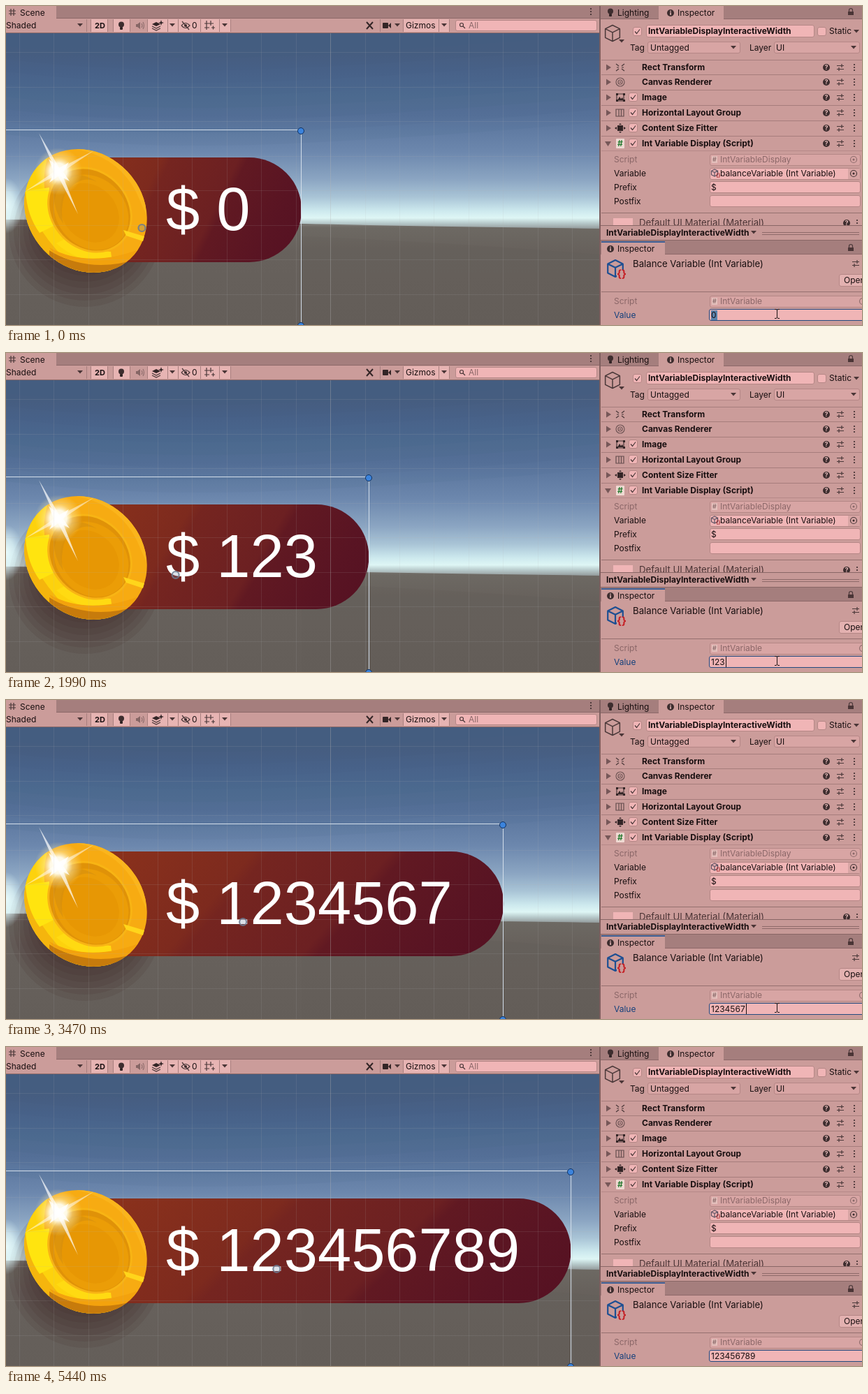
An HTML page for the animation above (5.56 s loop, 1225 by 457 pixels).

```html
<!DOCTYPE html>
<html lang="en">
<head>
<meta charset="utf-8">
<title>Int variable display</title>
<style>
html, body { margin: 0; width: 100%; height: 100%; overflow: hidden; background: #cb9c9a; }
svg { display: block; width: 1225px; height: 457px; }
text { font: 12px Inter, sans-serif; fill: #190f10; white-space: pre; }
.bold { font-weight: 700; }
.big { font-size: 13.2px; }
.dim { fill: #8b6768; }
#amount { font: 86.7px "Liberation Sans", Arial, sans-serif; fill: #fff; }
.icon { fill: none; stroke: #4a3839; stroke-width: 1.2; }
</style>
</head>
<body>
<svg id="stage" viewBox="0 0 1225 457" xmlns="http://www.w3.org/2000/svg">
  <defs>
    <linearGradient id="sky" x2="0" y2="1">
      <stop stop-color="#4c607f"/><stop offset=".2" stop-color="#4f678e"/>
      <stop offset=".42" stop-color="#58739b"/><stop offset=".6" stop-color="#6c87ad"/>
      <stop offset=".74" stop-color="#8ba5c2"/><stop offset=".83" stop-color="#a9c4d6"/>
      <stop offset=".9" stop-color="#cde9ee"/><stop offset=".935" stop-color="#def6f5"/>
      <stop offset=".96" stop-color="#b9cccd"/><stop offset="1" stop-color="#85898a"/>
    </linearGradient>
    <linearGradient id="ground" x2="0" y2="1">
      <stop stop-color="#7f7e79"/><stop offset=".08" stop-color="#6d6963"/>
      <stop offset=".3" stop-color="#67615c"/><stop offset="1" stop-color="#645e59"/>
    </linearGradient>
    <linearGradient id="maroon" x2="1.154" y2=".231">
      <stop offset=".12" stop-color="#8a311c"/><stop offset=".38" stop-color="#7d2a1e"/>
      <stop offset=".41" stop-color="#752520"/><stop offset=".63" stop-color="#6c2022"/>
      <stop offset=".66" stop-color="#611922"/><stop offset=".85" stop-color="#591423"/>
      <stop offset="1" stop-color="#551122"/>
    </linearGradient>
    <radialGradient id="glow">
      <stop stop-color="#fff"/><stop offset=".35" stop-color="#fffdf0" stop-opacity=".95"/>
      <stop offset=".6" stop-color="#fff1b8" stop-opacity=".45"/><stop offset="1" stop-color="#ffe9a0" stop-opacity="0"/>
    </radialGradient>
    <radialGradient id="haze">
      <stop stop-color="#e9fbfb"/><stop offset=".5" stop-color="#dcf2f5" stop-opacity=".7"/>
      <stop offset="1" stop-color="#c9e0ea" stop-opacity="0"/>
    </radialGradient>
    <clipPath id="view"><rect y="38" width="850" height="419"/></clipPath>
    <clipPath id="coinEdge"><ellipse rx="93.7" ry="82.2" transform="translate(114 293.5) rotate(47)"/></clipPath>
    <clipPath id="materialRow"><rect x="852" y="297" width="373" height="17"/></clipPath>
  </defs>

  <g clip-path="url(#view)">
    <rect y="38" width="850" height="284" fill="url(#sky)"/>
    <g id="skyBands" fill="#3c5378" fill-opacity=".06"/>
    <path d="M0 306Q300 309 425 312T850 319V457H0Z" fill="url(#ground)"/>
    <path d="M423 330Q620 338 850 356V457H423Z" fill="#5f5954" opacity=".2"/>
    <g id="coinShadow" fill="#3b1c20" fill-opacity=".11"/>
    <ellipse cx="0" cy="286" rx="24" ry="40" fill="url(#haze)"/>
    <rect id="pill" x="57" y="217" height="150" rx="75" fill="url(#maroon)"/>
    <g clip-path="url(#coinEdge)">
      <rect x="20" y="195" width="190" height="195" fill="#f7ab12"/>
      <path d="M20 250L60 215Q38 290 105 358L150 372V395H20Z" fill="#fdd20d"/>
      <path d="M28 262Q34 310 82 360L70 382L20 330Z" fill="#f5b50d"/>
      <path d="M28 265L62 260Q60 290 74 312L48 325Q30 300 28 265Z" fill="#ffe40f"/>
      <path d="M72 340L95 328Q118 350 150 352L152 366Q105 370 72 340Z" fill="#ffda12"/>
      <path d="M62 350Q110 382 192 358V395H62Z" fill="#c77b0c"/>
      <path d="M62 346Q120 378 200 345L190 362Q120 384 66 352Z" fill="#f3a20d"/>
      <path d="M95 204Q160 214 187 268L201 300L196 240L130 195Z" fill="#fbb51c"/>
    </g>
    <g transform="translate(120 292) rotate(47)">
      <ellipse rx="66" ry="56" fill="#f8b414"/>
      <ellipse rx="63" ry="53" fill="#e09208"/>
      <ellipse cx="4" cy="1" rx="58" ry="49" fill="#eb9d07"/>
      <ellipse cx="3" cy="3" rx="46" ry="38" fill="#e79704"/>
    </g>
    <path d="M69 262Q94 228 130 252Q106 240 84 270Q77 294 82 312Q66 290 69 262Z" fill="#cf8b13" opacity=".5"/>
    <path d="M168 321L198 330L196 337L172 329Z" fill="#ffd51b"/>
    <circle cx="75" cy="237" r="34" fill="url(#glow)"/>
    <g fill="#fff">
      <path d="M47 182L78 235L103 298L72 239Z" opacity=".7"/>
      <path d="M126 207L77 240L27 266L74 234Z" opacity=".5"/>
      <path d="M61 219L76 232L90 224L82 238L91 251L76 243L62 253L69 239Z" opacity=".8"/>
    </g>
    <g id="grid" stroke="#b6b6b6"/>
    <path id="frame" fill="none" stroke="#d3deea" stroke-width="1"/>
    <text id="amount" y="321" text-anchor="middle"></text>
    <circle id="pivot" cy="318" r="5" fill="#7088a8" fill-opacity=".25" stroke="#6b7a91" stroke-opacity=".85" stroke-width="2.2"/>
    <g id="handles" fill="#3b83dc" stroke="#10305f"><circle cy="179" r="4.5"/><circle cy="458" r="4.5"/></g>
  </g>

  <g id="toolbar"></g>
  <g id="inspector"></g>
  <rect id="selection" x="1009" y="436" width="9" height="14" fill="#5c83ad"/>
  <text id="value" x="1009" y="447"></text>
  <rect id="caret" y="435" width="1" height="15" fill="#190f10"/>
  <path id="beam" d="M-3 -6.500H-1L.5 -5.500L2 -6.500H4M.5 -5.500V5.500M-3 6.500H-1L.5 5.500L2 6.500H4" fill="none" stroke="#1c1415"/>
  <path id="arrow" d="M0 0V15L4 11.500L7 17L9 16L6.500 11H11Z" fill="#fff" stroke="#000"/>
</svg>
<script>
const $ = id => document.getElementById(id);
const range = (n, make) => Array.from({ length: n }, (_, i) => make(i)).join('');

const rect = (x, y, w, h, fill, extra = '') =>
  `<rect x="${x}" y="${y}" width="${w}" height="${h}" fill="${fill}" ${extra}/>`;
const label = (x, y, text, cls = '', extra = '') =>
  `<text x="${x}" y="${y}" class="${cls}" ${extra}>${text}</text>`;
const path = (d, extra = 'class="icon"') => `<path d="${d}" ${extra}/>`;
const solid = (d, fill = '#332526') => path(d, `fill="${fill}"`);
const dot = (x, y, r, fill = '#3d2d2e') => `<circle cx="${x}" cy="${y}" r="${r}" fill="${fill}"/>`;
const ring = (x, y, r) => `<circle cx="${x}" cy="${y}" r="${r}" class="icon"/>`;
const line = (x, y, w, color = '#95706f') => rect(x, y, w, 1, color);
const down = (x, y) => solid(`M${x - 4} ${y - 2}h8l-4 4.500z`, '#4a3536');
const kebab = (x, y) => [-4, 0, 4].map(d => dot(x, y + d, 1.1)).join('');
const field = (x, y, w, h = 17, fill = '#f0b5b6') =>
  rect(x + .5, y + .5, w - 1, h - 1, fill, 'rx="2.5" stroke="#b58786"');
const bulb = (x, y) => dot(x, y - 1.5, 4) + rect(x - 2, y + 2, 4, 4, '#332526', 'rx="1"');
const info = (x, y) => dot(x, y, 5) + rect(x - .7, y - 1, 1.500, 4, '#e8bdbb') + dot(x, y - 2.600, .9, '#e8bdbb');
const lock = (x, y) => path(`M${x - 2.500} ${y - 1}v-2a2.500 2.500 0 0 1 5 0v2`) + rect(x - 4, y - 1, 8, 5, '#4a3536');
const sliders = (x, y) => path(`M${x - 5} ${y - 2.500}h10M${x - 5} ${y + 2.500}h10M${x + 2} ${y - 5}v5M${x - 2} ${y}v5`);
const help = (x, y) => dot(x, y, 5) + label(x, y + 3.300, '?', 'bold',
  'text-anchor="middle" style="font-size:9px;fill:#e8bdbb"');
const check = (x, y, on = true) => field(x - 6.5, y - 6.5, 13, 13) +
  (on ? path(`M${x - 3.500} ${y}l2.500 3l4.500 -6`) : '');
const cube = (x, y, r, color = '#4a3839', width = 1.500) => path(
  `M${x} ${y - r}l${r * .9} ${r * .45}v${r * 1.1}l${-r * .9} ${r * .45}l${-r * .9} ${-r * .45}v${-r * 1.1}zm${-r * .9} ${r * .45}l${r * .9} ${r * .45}l${r * .9} ${-r * .45}M${x} ${y - r * .1}v${r * 1.1}`,
  `fill="none" stroke="${color}" stroke-width="${width}" stroke-linejoin="round"`);
const target = (x, y) => ring(x, y, 4.5) + dot(x, y, 1.5);

function drawScene() {
  $('skyBands').innerHTML = range(8, i => {
    const y = 48 + i * 18;
    return path(`M0 ${y + 10}Q200 ${y + 34} 430 ${y + 22}T850 ${y - 8}V38H0Z`, '');
  });
  $('coinShadow').innerHTML = range(7, i =>
    `<ellipse cx="113" cy="${323 - i}" rx="${109 - i * 7}" ry="${108 - i * 8}"/>`);
  $('grid').innerHTML =
    range(17, i => path(`M${Math.round(19 + i * 49.45)}.5 38V457`, `opacity="${i === 9 ? .35 : .13}"`)) +
    range(8, i => path(`M0 ${Math.round(66 + i * 49.5)}.5H850`, 'opacity=".13"'));
}

function drawToolbar() {
  const light = '#e7b4b3';
  $('toolbar').innerHTML =
    rect(0, 0, 850, 18, '#a57e7d') + rect(0, 0, 72, 18, '#cb9c9a') +
    rect(0, 18, 850, 20, '#cb9c9a') + line(72, 17, 778, '#8d6969') + line(0, 38, 850, '#8d6969') +
    path('M7 4v10M11 4v10M4 7h10M4 11h10') + label(20, 14, 'Scene') + kebab(837, 8) +
    label(0, 32, 'Shaded') + down(106, 27) +
    [[122, 23], [154, 23], [202, 119], [569, 65]].map(([x, w]) => rect(x, 19, w, 18, light)).join('') +
    [115, 121, 145, 153, 177, 202, 231, 246, 278, 305, 321, 535, 568, 619, 634]
      .map(x => rect(x, 19, 1, 18, '#a87f7e')).join('') +
    label(127, 32, '2D', 'bold', 'style="font-size:11px"') + bulb(165, 28) +
    `<g opacity=".45">${solid('M186 26h2l4-3v10l-4-3h-2z') + path('M194 25q2 3 0 6M196 23q3 5 0 10')}</g>` +
    solid('M209 26l6-3l6 3l-6 3z') + path('M209 29l6 3l6-3M209 32l6 3l6-3') +
    solid('M222 20l1 3l3 1l-3 1l-1 3l-1-3l-3-1l3-1z') + down(238, 27) +
    path('M251 28q6-7 12 0q-6 7-12 0M252 22l10 12') + dot(257, 28, 2) + label(266, 32, '0') +
    path('M287 21v13M293 21v7M284 25h13M284 31h7M294 31h5M296.500 28.500v5') + down(313, 27) +
    path('M516 23l9 10M525 23l-9 10', 'stroke="#332526" stroke-width="2"') +
    rect(539, 24, 8, 8, '#332526', 'rx="1"') + solid('M547 28l4-4v8z') + down(560, 27) +
    label(572, 32, 'Gizmos') + down(627, 27) +
    field(643, 20, 203, 16) + ring(652, 27, 2.5) + path('M654 29l3 3') + label(662, 32, 'All', 'dim');
}

function drawComponents() {
  const names = ['Rect Transform', 'Canvas Renderer', 'Image', 'Horizontal Layout Group',
    'Content Size Fitter', 'Int Variable Display (Script)'];
  const icons = [
    y => path(`M873 ${y - 5}l4 3M885 ${y - 5}l-4 3M873 ${y + 5}l4-3M885 ${y + 5}l-4-3M874 ${y}h3M881 ${y}h3`),
    y => `<g opacity=".7">${ring(879, y, 6) + ring(879, y, 3) + dot(879, y, 1)}</g>`,
    y => path(`M874 ${y - 5}h10v10h-10z`) + solid(`M875 ${y + 4}l3-5l2 3l2-2l2 4z`) +
      [873, 883].map(x => rect(x, y - 6, 3, 3, '#332526') + rect(x, y + 3, 3, 3, '#332526')).join(''),
    y => `<g opacity=".8">${path(`M873 ${y - 5}h11v10h-11zM877 ${y - 5}v10M880.500 ${y - 5}v10`)}</g>`,
    y => rect(875, y - 4, 8, 8, '#332526') + solid(`M871 ${y}l3-2v4zM887 ${y}l-3-2v4zM879 ${y - 7}l2 2h-4zM879 ${y + 7}l2-2h-4z`),
    y => rect(873, y - 7, 12, 14, '#efd9d2', 'rx="1"') + label(879, y + 4, '#', 'bold', 'text-anchor="middle" style="fill:#287b32"')
  ];
  return names.map((name, i) => {
    const y = Math.round(87.5 + i * 21.8);
    const fold = i === 5 ? `M857 ${y - 3}h9l-4.500 7z` : `M859 ${y - 4.500}l7 4.500l-7 4.500z`;
    return line(852, y - 11, 373, '#a67d7c') + solid(fold, '#765758') + icons[i](y) +
      (i > 1 ? check(897.5, y - .5) : '') + label(910, y + 4, name, 'bold') +
      help(1174, y) + sliders(1194, y) + kebab(1214, y);
  }).join('');
}

function drawInspector() {
  const pale = '#d8a5a4';
  const tab = (x, y, w) => rect(x, y, w, 19, '#cb9c9a');
  $('inspector').innerHTML =
    rect(850, 0, 375, 457, '#cb9c9a') + rect(850, 0, 375, 19, '#a57e7d') + tab(934, 0, 93) +
    line(851, 18, 83, '#8d6969') + line(1027, 18, 198, '#8d6969') +
    bulb(865, 9) + label(875, 14, 'Lighting') + info(951, 10) + label(961, 14, 'Inspector') + lock(1209, 9) +
    cube(868, 39, 11.5) + down(881, 50) + check(903.5, 36.5) +
    field(916, 27, 241, 18) + label(919, 40, 'IntVariableDisplayInteractiveWidth', 'bold') +
    check(1167.5, 36.5, false) + label(1178, 40, 'Static') + down(1217, 36) +
    label(893, 64, 'Tag') + field(918, 51, 133, 17, pale) + label(922, 64, 'Untagged') + down(1041, 59) +
    label(1064, 64, 'Layer') + field(1099, 51, 123, 17, pale) + label(1102, 64, 'UI') + down(1213, 59) +
    drawComponents() + line(852, 207, 373, '#b58988') +
    label(870, 224, 'Script', 'dim') + field(1007, 212, 216, 17, pale) +
    `<g opacity=".5">${rect(1010, 215, 8, 10, '#efd9d2') + label(1011, 223, '#', '', 'style="font-size:9px"') + target(1213, 220)}</g>` +
    label(1022, 224, 'IntVariableDisplay', 'dim') +
    label(870, 244, 'Variable') + field(1007, 232, 216) + rect(1205, 233, 17, 15, pale) + cube(1014, 239, 5, '#5b5161', 1.2) +
    label(1016, 245, '{}', 'bold', 'style="font-size:7px;fill:#a4292c"') +
    label(1022, 244, 'balanceVariable (Int Variable)') + target(1213, 240) +
    label(870, 264, 'Prefix') + field(1007, 251, 216) + label(1009, 264, '$') +
    label(870, 284, 'Postfix') + field(1007, 271, 216) +
    line(852, 296, 373) +
    `<g clip-path="url(#materialRow)">${rect(869, 304, 28, 20, '#f0b5b6') +
      label(906, 315, 'Default UI Material (Material)', 'big', 'style="fill:#4b3435"') +
      help(1203, 311) + kebab(1218, 311)}</g>` +
    rect(850, 314, 375, 22, '#c79997') + line(850, 314, 375, '#896665') + line(850, 335, 375, '#896665') +
    label(859, 329, 'IntVariableDisplayInteractiveWidth', 'bold') + down(1070, 324) +
    line(1082, 324, 139, '#8d6969') + line(1082, 327, 139, '#8d6969') +
    rect(850, 336, 375, 20, '#a57e7d') + tab(852, 337, 91) + rect(852, 337, 91, 2, '#3c5f95') + line(943, 355, 282, '#8d6969') +
    info(865, 348) + label(875, 352, 'Inspector') + lock(1209, 347) +
    cube(872, 376, 12, '#1d4f92', 2.2) + rect(874, 379, 15, 12, '#cb9c9a') +
    label(874, 389, '{}', 'bold', 'style="font-size:15px;fill:#c51f24"') +
    label(897, 374, 'Balance Variable (Int Variable)', 'big') + sliders(1216, 369) +
    field(1192, 384, 50, 18, '#e3b1b0') + label(1199, 397, 'Open') +
    line(852, 409, 373) +
    label(870, 427, 'Script', 'dim') + field(1007, 415, 230, 17, pale) +
    `<g opacity=".5">${rect(1010, 418, 8, 10, '#efd9d2') + label(1011, 426, '#', '', 'style="font-size:9px"') + ring(1226, 423, 4.5)}</g>` +
    label(1022, 427, 'IntVariable', 'dim') +
    label(870, 447, 'Value', '', 'style="fill:#14407c"') +
    rect(1006.5, 434.5, 230, 16, '#f0b5b6', 'rx="2.5" stroke="#234a80"') +
    rect(849, 0, 2, 457, '#7f5f5f');
}

const LOOP = 5560;
const keyTimes = [1030, 1540, 1960, 2670, 2880, 3160, 3470, 3720, 4210];
const redrawTimes = keyTimes.map(t => t === 1960 || t === 2880 ? t + 30 : t);
const countBefore = (times, t) => times.filter(k => k <= t).length;
const typed = n => n ? '123456789'.slice(0, n) : '0';
const show = (id, on) => $(id).setAttribute('visibility', on ? 'visible' : 'hidden');
const set = (id, name, value) => $(id).setAttribute(name, value);

function update(t) {
  // The pill only widens on every second digit; the text overflows in between.
  const digits = countBefore(redrawTimes, t);
  const grow = 96.4 * Math.max(0, Math.floor((digits - 1) / 2));
  const right = 423 + grow;
  const edge = Math.floor(right - .4) + .5;
  set('pill', 'width', right - 57);
  set('frame', 'd', `M-5 177.500H${edge}V460`);
  set('handles', 'transform', `translate(${edge - .5} 0)`);
  set('pivot', 'cx', 194.500 + grow / 2);
  set('amount', 'x', 289.300 + grow / 2);
  $('amount').textContent = '$ ' + typed(digits);

  const keys = countBefore(keyTimes, t);
  $('value').textContent = typed(keys);
  set('caret', 'x', Math.round(1015.3 + 7.25 * (keys - 1)));
  show('caret', keys > 0 && t < 5440);
  show('selection', keys === 0);

  const step = t < 4830 ? 0 : Math.min(6, Math.floor((t - 4830) / 54) + 1);
  const at = `translate(${1103 + 14.2 * step} ${441 + 3 * step})`;
  set('beam', 'transform', at);
  set('arrow', 'transform', at);
  show('beam', step < 4);
  show('arrow', step >= 4 && step < 6);
}

drawScene();
drawToolbar();
drawInspector();
const start = performance.now();
function tick() {
  update((performance.now() - start) % LOOP);
  requestAnimationFrame(tick);
}
update(0);
requestAnimationFrame(tick);
</script>
</body>
</html>
```
